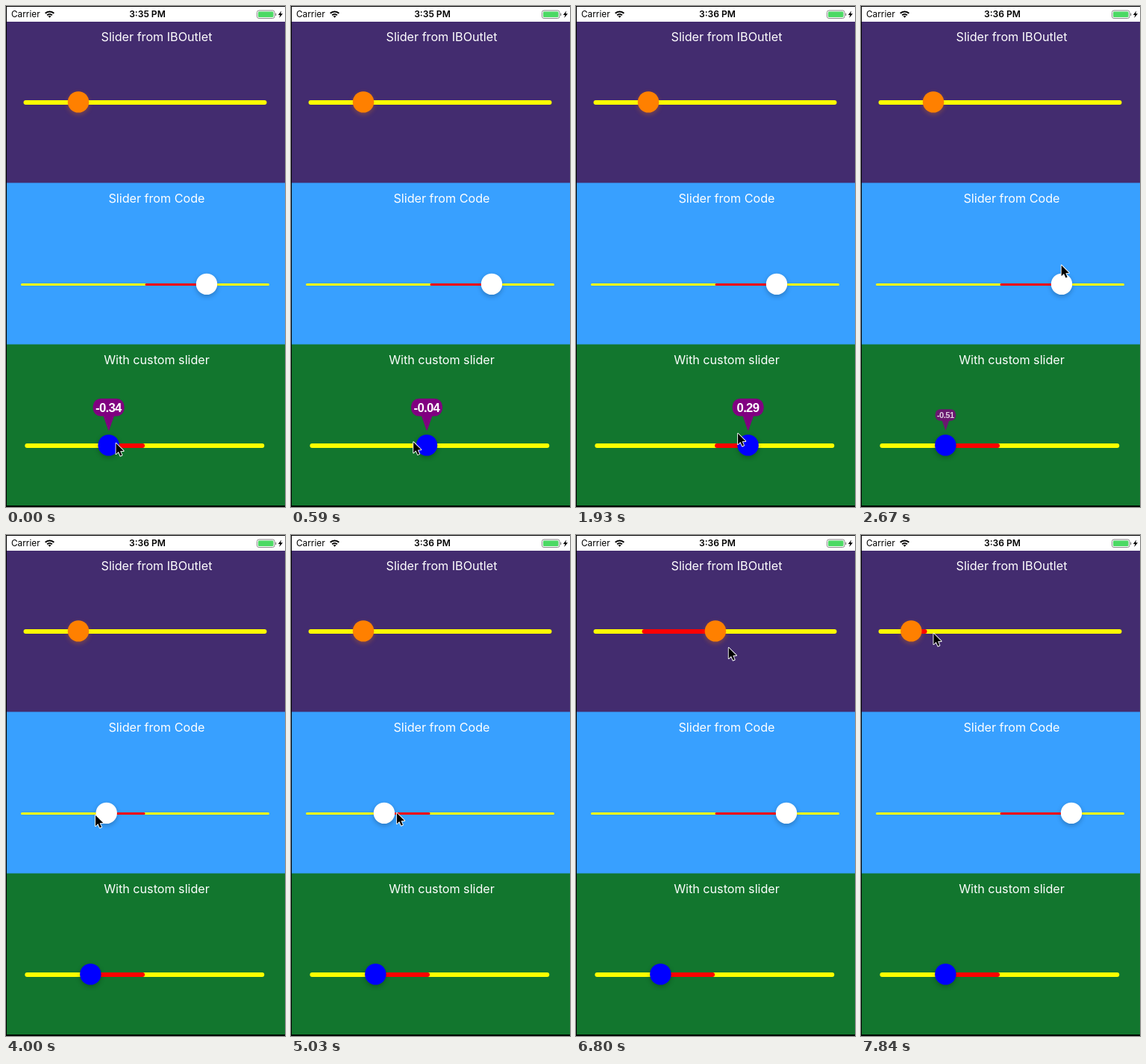
These frames come from a looping animation (374 px wide and 670 px high, 7990 ms). An HTML page with a canvas:

```html
<!DOCTYPE html>
<html lang="en">
<head>
<meta charset="utf-8">
<title>Sliders</title>
<style>
html, body { margin: 0; width: 100%; height: 100%; overflow: hidden; background: #000; }
canvas { display: block; width: 374px; height: 670px; }
</style>
</head>
<body>
<canvas id="stage"></canvas>
<script>
const W = 374, H = 670, LOOP = 7990, TICKS = 54;
const canvas = document.getElementById('stage');
const ctx = canvas.getContext('2d');
const dpr = window.devicePixelRatio || 1;
canvas.width = W * dpr;
canvas.height = H * dpr;

const UI = 'Inter, Roboto, sans-serif';
const YELLOW = '#ffff00', RED = '#ff0000', GREY = '#8a8a8a';

// Turning points of each drag as [tick, x].
const blueTurns = [[-0.8, 124], [2.8, 240], [5.2, 124], [7.46, 238], [10.06, 114], [12.5, 243], [15, 113.3]];
const whiteTurns = [[24.2, 269], [27.7, 120.5], [30.8, 200], [33.9, 124], [36, 282]];
const orangeTurns = [[44.3, 97], [46.87, 218], [52.45, 43.5], [54.75, 220]];

// Cosine swing between turning points, at rest before and after.
function swing(turns, t) {
  const next = turns.findIndex(p => p[0] > t);
  if (next === 0) return turns[0][1];
  if (next < 0) return turns[turns.length - 1][1];
  const [t0, a] = turns[next - 1], [t1, b] = turns[next];
  return a + (b - a) * (1 - Math.cos(Math.PI * (t - t0) / (t1 - t0))) / 2;
}

// While dragging, the pointer runs a little ahead of the knob.
function pointerX(t) {
  if (t < 16) return swing(blueTurns, t + 0.25);
  if (t < 24) return swing([[16, 113], [18.4, 279], [22, 265]], t);
  if (t < 37) return swing(whiteTurns, t + 0.4) - 4;
  if (t < 44) return swing([[37, 278], [43, 97]], t);
  return swing(orangeTurns, t + 0.3);
}

function pointerY(t) {
  if (t < 24) return swing([[0, 584], [9, 580], [15, 568], [16, 568], [18.4, 330], [22, 371]], t);
  if (t < 37) return swing([[24, 371], [27, 374], [34, 371], [36, 380]], t);
  return swing([[37, 380], [43, 130], [44, 130], [46, 150], [53, 131]], t);
}

// The callout swells briefly, then collapses.
function popScale(t) {
  const d = Math.max(0, t - 16);
  return Math.max(0, 1 + 0.55 * d - 0.36 * d * d);
}

function rect(color, x, y, w, h) {
  ctx.fillStyle = color;
  ctx.fillRect(x, y, w, h);
}

function pill(color, x, y, w, h, r = h / 2) {
  ctx.fillStyle = color;
  ctx.beginPath();
  ctx.roundRect(x, y, w, h, r);
  ctx.fill();
}

function poly(...points) {
  ctx.beginPath();
  points.forEach(([x, y]) => ctx.lineTo(x, y));
  ctx.closePath();
}

function text(str, x, y, font, color, align = 'center') {
  ctx.font = font;
  ctx.fillStyle = color;
  ctx.textAlign = align;
  ctx.fillText(str, x, y);
}

function slider({ left, right, y, thick, pivot, color, shadow }, x) {
  const top = y - thick / 2;
  pill(YELLOW, left, top, right - left, thick);
  pill(RED, Math.min(pivot, x), top, Math.abs(x - pivot), thick);
  ctx.save();
  ctx.shadowColor = shadow;
  ctx.shadowBlur = 6 * dpr;
  ctx.shadowOffsetY = 2.5 * dpr;
  ctx.fillStyle = color;
  ctx.beginPath();
  ctx.arc(x, y - 0.6, 14.2, 0, 7);
  ctx.fill();
  ctx.restore();
}

function callout(x, scale) {
  if (!scale) return;
  ctx.save();
  ctx.translate(x, 567);
  ctx.scale(scale, scale);
  ctx.globalAlpha = Math.min(1, 0.4 + scale * 0.6);
  pill('#800080', -21, -42, 42, 23.5, 10.5);
  poly([-7.5, -20], [7.8, -20], [0.6, 0.5], [-0.4, 0.5]);
  ctx.fill();
  ctx.letterSpacing = '-0.7px';
  text(((x - 187.6) / 147).toFixed(2), -0.2, -24.4, 'bold 16.7px "Liberation Sans", Arial, sans-serif', '#fff');
  ctx.restore();
}

function pointer(x, y) {
  ctx.save();
  ctx.translate(x + 0.8, y + 0.8);
  poly([0, 0], [0, 14.4], [3.3, 11.3], [5.8, 16.8], [8, 15.8], [5.6, 10.5], [10.2, 10.2]);
  ctx.lineJoin = 'round';
  ctx.lineWidth = 1.8;
  ctx.strokeStyle = '#fff';
  ctx.stroke();
  ctx.fillStyle = '#000';
  ctx.fill();
  ctx.restore();
}

function statusBar(clock) {
  rect('#fff', 1, 1, W - 1, 20);
  text('Carrier', 7, 15.3, `11.8px ${UI}`, '#000', 'left');
  text(clock, 189.5, 15.3, `600 12.1px ${UI}`, '#000');

  const a = -Math.PI * 0.75, b = -Math.PI * 0.25;
  ctx.strokeStyle = '#000';
  ctx.lineWidth = 2;
  for (const r of [4.7, 8.2]) {
    ctx.beginPath();
    ctx.arc(58.5, 15.6, r, a, b);
    ctx.stroke();
  }
  ctx.beginPath();
  ctx.moveTo(58.5, 15.8);
  ctx.arc(58.5, 15.6, 2.6, a, b);
  ctx.fill();

  ctx.strokeStyle = GREY;
  ctx.lineWidth = 1;
  ctx.beginPath();
  ctx.roundRect(336.5, 6, 23.5, 10.5, 2.5);
  ctx.stroke();
  pill('#4cd964', 338, 7.5, 20.5, 7.5, 1.2);
  pill(GREY, 361, 9.5, 1.3, 3.6, 0.6);
  ctx.fillStyle = '#000';
  poly([369.2, 6.6], [364.8, 11.9], [367.4, 11.9], [366.2, 16], [371, 10.3], [368.2, 10.3]);
  ctx.fill();
}

const SHADE = 'rgba(0,0,0,0.24)';
const panels = [
  { title: 'Slider from IBOutlet', back: '#432c6f', turns: orangeTurns, left: 23.5, right: 349.5,
    y: 129, thick: 6, pivot: 88.5, color: '#ff8000', shadow: 'rgba(255,128,0,0.3)' },
  { title: 'Slider from Code', back: '#38a0ff', turns: whiteTurns, left: 20, right: 353,
    y: 372.5, thick: 3, pivot: 186.5, color: '#fff', shadow: SHADE },
  { title: 'With custom slider', back: '#12762e', turns: blueTurns, left: 25.3, right: 346.3,
    y: 588, thick: 6, pivot: 186, color: '#0000ff', shadow: SHADE }
];

function draw(t) {
  ctx.setTransform(dpr, 0, 0, dpr, 0, 0);
  rect('#000', 0, 0, W, H);
  panels.forEach((p, i) => {
    const top = 20.5 + 216 * i;
    rect(p.back, 1, top, W - 1, 668 - top);
    text(p.title, 202, top + 26.6, `16.15px ${UI}`, '#fff');
    slider(p, swing(p.turns, t));
  });
  statusBar(t < 12 ? '3:35 PM' : '3:36 PM');
  callout(swing(blueTurns, t), popScale(t));
  pointer(pointerX(t), pointerY(t));
}

// The picture advances in held steps.
function frame() {
  const ms = performance.now() % LOOP;
  draw(Math.min(TICKS - 1, Math.floor(ms / LOOP * TICKS + 0.05)));
  requestAnimationFrame(frame);
}
frame();
</script>
</body>
</html>
```
